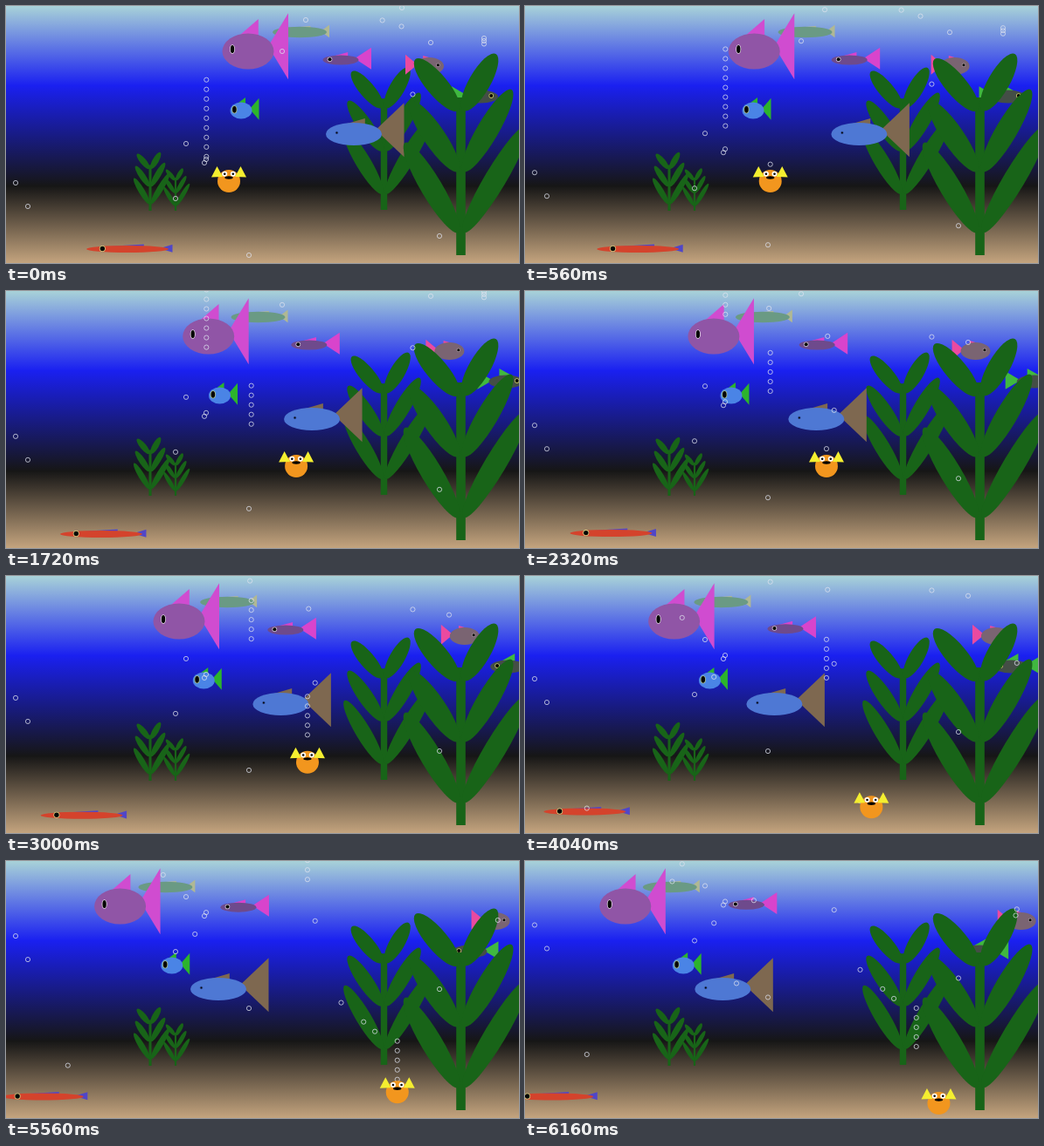
An HTML page with a canvas for the animation above (6.2 s loop, 587 px wide and 295 px high).

```html
<!DOCTYPE html>
<html>
<head>
<meta charset="utf-8">
<title>Aquarium</title>
<style>
html, body { margin: 0; width: 100%; height: 100%; overflow: hidden; background: #181818; }
canvas { display: block; }
</style>
</head>
<body>
<canvas id="tank" width="587" height="295"></canvas>
<script>
const ctx = document.getElementById('tank').getContext('2d');
const W = 587, H = 295, LOOP = 6200, FRAME = 40;
const TICK = 40.9;          // ms per simulation tick
const RISE = 0.86;          // slow bubbles, px per tick
const RUSH = 2.575;         // puffer's bubbles, px per tick

const clamp = v => Math.max(0, Math.min(1, v));

// Piecewise linear value through [position, value] pairs
function lerp(keys, p) {
  let value = keys[0][1];
  for (let i = 1; i < keys.length; i++) {
    const [a, va] = keys[i - 1], [b, vb] = keys[i];
    value += (vb - va) * clamp((p - a) / (b - a));
  }
  return value;
}

const water = ctx.createLinearGradient(0, 0, 0, H);
[[0, '#a8d2d8'], [0.31, '#1a20f0'], [0.7, '#161616'], [1, '#c4a47e']].forEach(s => water.addColorStop(...s));

function ellipse(x, y, rx, ry, color, angle = 0) {
  ctx.beginPath();
  ctx.ellipse(x, y, rx, ry, angle, 0, Math.PI * 2);
  ctx.fillStyle = color;
  ctx.fill();
}

function triangle(x1, y1, x2, y2, x3, y3, color) {
  ctx.beginPath();
  ctx.moveTo(x1, y1);
  ctx.lineTo(x2, y2);
  ctx.lineTo(x3, y3);
  ctx.closePath();
  ctx.fillStyle = color;
  ctx.fill();
}

// Three tiers of leaf pairs, longer towards the ground
function plant(x, y, s) {
  const color = '#186418';
  const leaf = (root, tipX, tipY) => {
    const rootX = 3 * Math.sign(tipX), dx = tipX - rootX, dy = tipY - root;
    ellipse(rootX + dx / 2, root + dy / 2, Math.hypot(dx, dy) / 2, 12.3, color, Math.atan2(dy, dx));
  };
  ctx.save();
  ctx.translate(x, y);
  ctx.scale(s, s);
  ctx.fillStyle = color;
  ctx.fillRect(-5.3, -181, 10.6, 181);
  for (let i = 0; i < 3; i++) {
    const root = -166 + 70 * i;
    leaf(root, -52 - 6 * i, root - 59 - 22 * i);
    leaf(root, 40 + 18 * i, root - 65 - 29 * i);
  }
  ctx.restore();
}

const swim = (x, v) => n => x + v * n;
const at = y => () => y;
const TURN = 59;

// tail: [reach, half height], fin: height, eye: [rx, ry, ring], puff: [offset, first tick]
const school = [
  { x: swim(336, -1.13), y: at(30), rx: 31, ry: 6.3, color: '#6a9a84', trim: '#b0b894',
    tail: [34, 7.3], fin: 7, puff: [-6, -53] },
  { x: swim(277, -1.077), y: at(52), rx: 29.5, ry: 20.5, color: '#9055a6', trim: '#d04cd0',
    tail: [46, 38], fin: 37, eye: [2.2, 4.6, '#e8e0e8'], puff: [4, 94] },
  { x: swim(269, -0.583), y: at(120), rx: 12.5, ry: 9.5, color: '#4a84e6', trim: '#2cb42c',
    tail: [20.5, 12.5], fin: 15, eye: [2.3, 3.8, '#a8c090'], puff: [2, 94] },
  { x: swim(383, -0.861), y: n => 62 - 0.2 * Math.max(0, n - 92), rx: 20.5, ry: 5.5, color: '#6e4a8c', trim: '#d844cc',
    tail: [35, 12.5], fin: 9, eye: [2, 2, '#c8c0d0'], puff: [2, -53] },
  { x: swim(484, 0.556), y: at(69), right: at(true), rx: 17, ry: 10, color: '#7a6472', trim: '#ea4aa0',
    tail: [27, 11.5], fin: 12, eye: [1.5, 1.5, '#a09098'], puff: [-2, -53] },
  { x: n => 543 + 0.7 * (TURN - Math.abs(n - TURN)), y: at(104), right: n => n < TURN, rx: 20, ry: 7.5,
    color: '#444e46', trim: '#40b840', tail: [33, 10.3], fin: 15, eye: [2, 2, '#c0c060'], puff: [3, 94] },
  { x: swim(398, -1.14), y: at(147), rx: 32, ry: 13, color: '#4e78d4', trim: '#7e6850',
    tail: [57.5, 31], fin: 18, eye: [1, 1, '#3858a8'], puff: [7, -53] },
  { x: swim(139, -0.715), y: n => 279 - 8.5 * clamp((n - 52) / 43), rx: 47, ry: 4, color: '#d4432c', trim: '#5046c8',
    tail: [51.5, 4.5], fin: 5.5, eye: [2.7, 2.7, '#d8d080'], puff: [-1, 94] }
];

// Drawn facing left, mirrored when heading right
function fish({ x, y, right, rx, ry, color, trim, tail: [reach, half], fin, eye }, n) {
  const mid = -0.15 * half;
  ctx.save();
  ctx.translate(x(n), y(n));
  if (right && right(n)) ctx.scale(-1, 1);
  triangle(reach, mid - half, reach, mid + half, 0.78 * rx, mid, trim);
  triangle(0.4 * rx, -fin, -0.4 * rx, -0.8 * ry, 0.4 * rx, -0.6 * ry, trim);
  ellipse(0, 0, rx, ry, color);
  if (eye) {
    const ex = -0.61 * rx, ey = -0.12 * ry;
    ellipse(ex, ey, eye[0] + 0.8, eye[1] + 0.8, eye[2]);
    ellipse(ex, ey, eye[0], eye[1], '#050505');
  }
  ctx.restore();
}

// The puffer hops along a grid and blows bubbles while it rests
const STEP = 12.85, BLOW = 4.28;
const COLS = [[-9, -2], [0, 0.2], [5, 2], [25, 2], [45, 7], [66, 7], [98, 11.2], [109, 13.5], [113, 15], [132, 15], [147, 17]];
const ROWS = [[66, 0], [91, 5], [132, 5], [147, 6]];
const RESTS = [[-46, -10], [5, 25], [48, 67], [95, 99], [103, 132]];

const hop = (keys, n) => STEP * Math.floor(lerp(keys, n) + 1e-6);
const pufferAt = n => [255 + hop(COLS, n), 201 + hop(ROWS, n)];

function puffer(n) {
  ctx.save();
  ctx.translate(...pufferAt(n));
  ellipse(0, 0, 13, 13, '#f2961e');
  for (const s of [-1, 1]) {
    triangle(s * 13.5, -17, s * 20, -4.5, s * 7, -5, '#f4ee30');
    ellipse(s * 4.8, -8.3, 3, 3, '#fff');
    ellipse(s * 4.8, -8.3, 1.3, 1.3, '#000');
  }
  ellipse(0, -4, 4.7, 1.7, '#000');
  ctx.restore();
}

function bubble(x, y) {
  ctx.beginPath();
  ctx.arc(x, y, 2.6, 0, Math.PI * 2);
  ctx.stroke();
}

// Bubbles already adrift when the loop begins
const ADRIFT = [
  [11, 203], [25, 230], [206, 158], [194, 221], [229, 176], [227, 180], [278, 286], [496, 264],
  [316, 52], [453, 2], [486, 42], [343, 16], [547, 37], [547, 40], [547, 43.5]
];
const PUFF_EVERY = 98;

function bubbles(n) {
  ctx.strokeStyle = 'rgba(222,226,238,0.75)';
  ctx.lineWidth = 1;
  for (const [x, y] of ADRIFT) bubble(x, y - RISE * n);
  for (const f of school)
    for (let b = f.puff[1]; b <= n; b += PUFF_EVERY) bubble(f.x(b) + f.puff[0], f.y(b) - RISE * (n - b));
  for (let b = 6.2 - 12 * BLOW; b <= n; b += BLOW) {
    if (!RESTS.some(([from, to]) => b >= from && b <= to)) continue;
    const [x, y] = pufferAt(b);
    bubble(x, y - RUSH * (n - b));
  }
}

function draw(ms) {
  const n = Math.floor(ms / FRAME) * FRAME / TICK;
  ctx.fillStyle = water;
  ctx.fillRect(0, 0, W, H);
  plant(165, 235, 0.29);
  plant(194, 235, 0.21);
  plant(432.5, 234, 0.706);
  for (const f of school) fish(f, n);
  plant(520.5, 286, 1);
  bubbles(n);
  puffer(n);
}

const start = performance.now();
function tick() {
  draw((performance.now() - start) % LOOP);
  requestAnimationFrame(tick);
}
tick();
</script>
</body>
</html>
```
